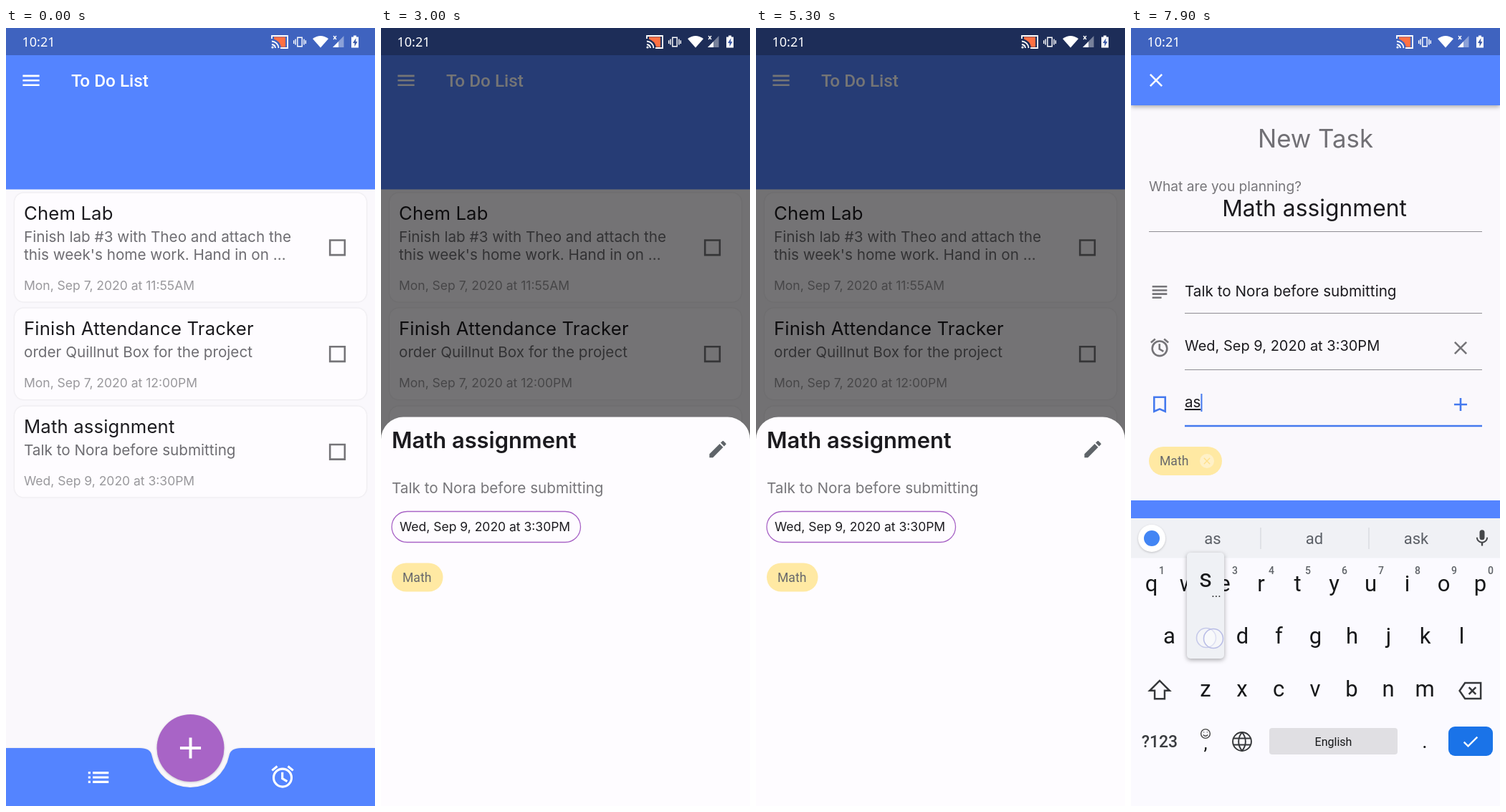
Recreate the animation shown at these times as an HTML page. Size 515 by 1087 pixels, loop 8000 ms.

```html
<!DOCTYPE html>
<html lang="en">
<head>
<meta charset="utf-8">
<title>To Do List</title>
<style>
html, body { margin: 0; width: 515px; height: 1087px; overflow: hidden; }
svg { display: block; }
text { font-family: Inter, sans-serif; white-space: pre; }
.rb { font-family: Roboto, sans-serif; }
.st { font-family: "Noto Sans", sans-serif; }
.mid { text-anchor: middle; }
.flat { filter: drop-shadow(0 .3px 1.2px #0002); }
.low { filter: drop-shadow(0 1px 1.5px #0003); }
.high { filter: drop-shadow(0 2px 3px #0005); }
</style>
</head>
<body>
<svg id="stage" width="515" height="1087" viewBox="0 0 515 1087"></svg>
<script>
const BLUE = '#5484ff', PURPLE = '#a864c6', YELLOW = '#ffe9a3', PAPER = '#faf8fc';
const INK = '#1c1b1f', GREY = '#6e6d72', PALE = '#99989c', KEY = '#17181a';

// Icons on a 24 unit grid; those listed in SOLID are filled, the rest stroked.
const ICONS = {
  menu: 'M3 7h18M3 12h18M3 17h18',
  plus: 'M12 5v14M5 12h14',
  close: 'M5.7 5.7l12.6 12.6M18.3 5.7L5.7 18.3',
  list: 'M3 8h2M3 12h2M3 16h2M7 8h14M7 12h14M7 16h14',
  subject: 'M4 6h16M4 10h16M4 14h16M4 18h10',
  box: 'M4 4h16v16H4z',
  bookmark: 'M6 4h12v15.5l-6-2.6-6 2.6z',
  alarm: 'M4 13a8 8 0 1 0 16 0a8 8 0 1 0-16 0M11.8 8v5.6l4.3 2.6M2.6 6.5l4.6-3.8M21.4 6.5l-4.6-3.8',
  shift: 'M12 3.5L3 12.5h4.5V20h9v-7.5H21z',
  erase: 'M7 4h16v16H7L1.5 12zM11 8.5l7 7M18 8.5l-7 7',
  globe: 'M2 12a10 10 0 1 0 20 0a10 10 0 1 0-20 0M3 8.5h18M3 15.5h18M12 2c-5 6-5 14 0 20c5-6 5-14 0-20',
  check: 'M4 12.5l5 5L20 6.5',
  smile: 'M3 12a9 9 0 1 0 18 0a9 9 0 1 0-18 0M8 9h1.5M14.5 9h1.5M7.5 14q4.5 5 9 0',
  vibrate: 'M8 4h8v16H8zM4.5 7v10M19.5 7v10M1.5 9v6M22.5 9v6',
  edit: 'M3 17.25V21h3.75L17.8 9.94l-3.75-3.75zM20.7 7.04a1 1 0 0 0 0-1.41l-2.34-2.34a1 1 0 0 0-1.41 0l-1.83 1.83 3.75 3.75z',
  mic: 'M12 14a3 3 0 0 0 3-3V5a3 3 0 0 0-6 0v6a3 3 0 0 0 3 3zM17.3 11a5.3 5.1 0 0 1-10.6 0H5a7 7 0 0 0 6 6.7V21h2v-3.3a7 7 0 0 0 6-6.7z'
};
const SOLID = ['edit', 'mic'];

const icon = (name, x, y, size, color, weight = 2) =>
  `<path d="${ICONS[name]}" transform="translate(${x - size / 2} ${y - size / 2}) scale(${size / 24})" ` +
  (SOLID.includes(name) ? `fill="${color}"/>` : `fill="none" stroke="${color}" stroke-width="${weight}"/>`);
const text = (s, x, y, size, color, cls = '', more = '') =>
  `<text x="${x}" y="${y}" font-size="${size}" fill="${color}" class="${cls}" ${more}>${s}</text>`;
const rect = (x, y, w, h, color, r = 0, more = '') =>
  `<rect x="${x}" y="${y}" width="${w}" height="${h}" rx="${r}" fill="${color}" ${more}/>`;
const disc = (x, y, r, color, more = '') => `<circle cx="${x}" cy="${y}" r="${r}" fill="${color}" ${more}/>`;
const rule = (x, y, more = '') => `<path d="M${x} ${y}H490" stroke="#8f8e93" stroke-width="1.2" ${more}/>`;

const NOTE = 'Talk to Nora before submitting', DUE = 'Wed, Sep 9, 2020 at 3:30PM';

function card(top, bottom, title, lines, date) {
  return rect(12, top, 491, bottom - top, '#fefcff', 13, 'class="flat"') +
    text(title, 25, top + 37.5, 25.7, INK, '', 'letter-spacing=".15"') +
    lines.map((s, i) => text(s, 25, top + 68.5 + i * 25.3, 20.7, GREY)).join('') +
    text(date, 25, bottom - 17, 17.5, PALE) +
    icon('box', 462.5, (top + bottom) / 2 + .3, 31, '#757478');
}

const home = rect(0, 0, 515, 1087, PAPER) + rect(0, 0, 515, 225.5, BLUE) +
  icon('menu', 35, 73.3, 31, '#fff') + text('To Do List', 91, 82, 24.3, '#fff', 'rb', 'font-weight="500"') +
  card(230.5, 382.5, 'Chem Lab', ['Finish lab #3 with Theo and attach the', "this week's home work. Hand in on …"], 'Mon, Sep 7, 2020 at 11:55AM') +
  card(391.5, 519, 'Finish Attendance Tracker', ['order Quillnut Box for the project'], 'Mon, Sep 7, 2020 at 12:00PM') +
  card(528.5, 655.5, 'Math assignment', [NOTE], DUE) +
  '<clipPath id="cardClip"><rect x="12" y="528" width="491" height="128" rx="13"/></clipPath>' +
  disc(0, 0, 0, '#000', 'id="splash" clip-path="url(#cardClip)"') +
  `<path class="low" fill="${BLUE}" d="M0 1006H186.5Q201.5 1006 203.5 1016.4A55 55 0 0 0 311.5 1016.4Q313.5 1006 328.5 1006H515V1087H0z"/>` +
  disc(257.5, 1006, 47, PURPLE, 'class="low"') + icon('plus', 257.5, 1006, 50, '#fff', 1.9) +
  icon('list', 129, 1047, 38, '#fff') + icon('alarm', 386, 1046, 37.5, '#fff');

const sheet = '<path d="M0 600V31.3A31.3 31.3 0 0 1 31.3 0H483.7A31.3 31.3 0 0 1 515 31.3V600z" fill="#fefcff"/>' +
  text('Math assignment', 15, 43.5, 30.9, INK, '', 'font-weight="600"') +
  icon('edit', 470, 45, 31, '#5f6469') + text(NOTE, 15, 106, 20.7, '#77767a') +
  rect(15, 132, 263.5, 43, 'none', 21.5, `stroke="${PURPLE}" stroke-width="1.3"`) + text(DUE, 26, 159.5, 17.5, INK) +
  rect(15, 204, 71.5, 40, YELLOW, 20) + text('Math', 30, 230, 17.6, '#66676b', 'rb');

const page = rect(0, 0, 515, 1087, PAPER) + rect(0, 0, 515, 108, BLUE, 0, 'class="high"') +
  icon('close', 35, 73, 31, '#fff') +
  text('New Task', 257.5, 167, 34.8, '#717075', 'mid') +
  text('What are you planning?', 25, 228, 19.2, '#77767a') +
  text('Math assignment', 256, 262.5, 31.8, INK, 'mid') + rule(25, 284.5) +
  icon('subject', 40, 369, 31, '#757478') + text(NOTE, 75, 375, 20.7, INK) + rule(75, 398.5) +
  icon('alarm', 40, 446.5, 31, '#757478') + text(DUE, 75, 451, 20, INK) + icon('close', 460, 447, 31, '#757478') + rule(75, 477.5) +
  '<g id="tagIcons">' + icon('bookmark', 40, 526, 31, 'currentColor') + icon('plus', 460, 526, 31, 'currentColor') + '</g>' +
  text('', 75, 530, 20.6, GREY, '', 'id="tag"') + rect(0, 511, 2, 25, '#4479ee', 0, 'id="caret"') + rule(75, 556, 'id="tagRule"') +
  rect(25, 585, 102, 40, YELLOW, 20) + text('Math', 40, 611, 17.6, '#66676b', 'rb') +
  disc(106, 605, 10, '#fff1c8') + icon('close', 106, 605, 16, '#ffe08a') +
  `<g id="update">${rect(0, 0, 515, 430, BLUE)}${text('Update', 257.5, 51, 29, '#fff', 'mid')}</g>`;

const keyRow = (letters, x, y) =>
  [...letters].map((c, i) => text(c, x + i * 51, y, 31, KEY, 'rb mid')).join('');
const keyboard = rect(0, 685, 515, 402, '#fbfaff') + rect(0, 685, 515, 55.5, '#f0f1f5') +
  disc(29, 713, 19, '#fff', 'class="low"') + disc(29, 713, 11, '#4285f4') +
  '<path d="M181 698v30M332 698v30" stroke="#cfd1d6"/>' +
  [114, 256, 398].map((x, i) => text('', x, 721, 22, '#5c6067', 'rb mid', `id="word${i}"`)).join('') +
  icon('mic', 490, 713, 28, '#444649') +
  keyRow('qwertyuiop', 28.5, 787) + keyRow('asdfghjkl', 53.5, 860) + keyRow('zxcvbnm', 104, 934) +
  [...'1234567890'].map((c, i) => text(c, 43 + i * 51, 763, 14, '#5f6368', 'rb mid', 'font-weight="500"')).join('') +
  icon('shift', 40, 925, 37, '#35373a', 1.6) + icon('erase', 473, 926, 33, '#35373a', 1.8) +
  text('?123', 40, 1005, 23, '#3a3c40', 'rb mid', 'font-weight="500"') +
  icon('smile', 104, 986, 17, '#444') + text(',', 104, 1008, 26, KEY, 'rb mid') +
  icon('globe', 155, 997, 31, '#35373a', 1.5) +
  rect(193, 978, 179, 37, '#e0dfe3', 4) + text('English', 282.5, 1002.5, 16, KEY, 'rb mid') +
  text('.', 410, 1006, 28, KEY, 'rb mid') +
  rect(443, 976, 62, 41, '#1a73e8', 9) + icon('check', 474, 997, 28, '#fff') +
  '<g id="popup">' + rect(-26, 733, 52, 148, '#eff1f5', 5, 'class="high"') +
  text('', 0, 781, 35, KEY, 'rb mid', 'id="popLetter"') + text('...', 15, 795, 17, KEY, 'rb mid') + '</g>';

const status = rect(0, 0, 515, 38, '#000', 0, 'opacity=".25"') + text('10:21', 22.5, 26, 18, '#fff', 'st') +
  '<path d="M374 12.5H390V26.5H384Q382 18 374 15.5z" fill="#ff7043"/>' +
  '<path d="M371 15V11H393V28H383M371 18.5a10 10 0 0 1 9.5 9.5M371 23a5.5 5.5 0 0 1 5 5" fill="none" stroke="#fff" stroke-width="1.8"/>' +
  disc(372, 27, 1.6, '#fff') + icon('vibrate', 410, 19.5, 19, '#fff', 1.8) +
  '<path d="M428 15q11-8 22 0l-11 12.5z" fill="#fff"/>' +
  '<path d="M471.5 11V27H456z" fill="#fff" opacity=".4"/><path d="M464 19V27H456z" fill="#fff"/>' +
  '<path d="M457 11l4 5M461 11l-4 5" stroke="#fff" stroke-width="1.3"/>' +
  '<path d="M482 12.5h3v-2h4v2h3V27.5h-10z" fill="#fff"/><path d="M488.5 14l-4.5 7h2.5v5l4-7h-2.500z" fill="#3b59a8"/>';

// Finger contacts: start, release, x, y and optional distance dragged down.
const TOUCHES = [
  [800, 950, 75, 580], [3600, 3740, 417, 640, 324], [4900, 5000, 60, 589], [5600, 5700, 470, 588],
  [6800, 6850, 200, 525], [7400, 7500, 54, 852], [7800, 7850, 105, 852], [7800, 8000, 115, 853]
];

document.getElementById('stage').innerHTML = home + rect(0, 0, 515, 1087, '#000', 0, 'id="scrim"') +
  `<g id="sheet">${sheet}</g><g id="page">${page}</g><g id="keyboard">${keyboard}</g>` +
  TOUCHES.map((_, i) => disc(0, 0, 13.5, '#ffffff66', `id="touch${i}" stroke="#b9bde6" stroke-width="1.6"`)).join('') + status;

const $ = id => document.getElementById(id);
const set = (id, attrs) => { for (const k in attrs) $(id).setAttribute(k, attrs[k]); };
const show = (id, on) => set(id, { visibility: on ? 'visible' : 'hidden' });
const clamp = v => Math.min(1, Math.max(0, v));

function bezier(x1, y1, x2, y2) {
  const at = (a, b, u) => 3 * a * u * (1 - u) ** 2 + 3 * b * u * u * (1 - u) + u ** 3;
  return x => {
    let lo = 0, hi = 1;
    for (let i = 0; i < 24; i++) {
      const u = (lo + hi) / 2;
      if (at(x1, x2, u) < x) lo = u; else hi = u;
    }
    return x <= 0 ? 0 : x >= 1 ? 1 : at(y1, y2, lo);
  };
}
const ease = bezier(.25, .1, .25, 1), easeIn = bezier(.42, 0, 1, 1);
const decelerate = bezier(0, 0, .2, 1), standard = bezier(.4, 0, .2, 1);

function drawSheet(t) {
  const opened = t < 4500 ? 950 : 4983;
  const dragging = t > 3550 && t < 4500;
  const progress = dragging ? clamp(1 - .856 * ((t - 3550) / 250) ** 1.3) : clamp((t - opened) / 250);
  const height = dragging ? progress : decelerate(progress);
  set('scrim', { opacity: .54 * ease(progress) });
  set('sheet', { transform: `translate(0 ${1087 - 543.5 * height})` });

  const since = t - opened, [, , x, y] = TOUCHES[t < 4500 ? 0 : 2];
  set('splash', {
    cx: x, cy: y, r: 18 + .0073 * Math.max(0, since) ** 2,
    opacity: since < -150 ? 0 : .12 * clamp(1 - since / 190)
  });
}

function drawPage(t) {
  const p = clamp((t - 5683.5) / 300);
  set('page', { opacity: easeIn(p), transform: `translate(0 ${271.75 * (1 - standard(p))})` });

  const focused = t >= 6900, typed = t >= 7900 ? 'as' : t >= 7500 ? 'a' : '';
  set('tagIcons', { color: focused ? '#4479ee' : '#757478' });
  set('tagRule', focused ? { stroke: '#4479ee', 'stroke-width': 2.5 } : { stroke: '#8f8e93', 'stroke-width': 1.2 });
  $('tag').textContent = typed || 'Add tags';
  set('tag', { fill: typed ? INK : GREY, 'text-decoration': typed ? 'underline' : 'none' });
  set('caret', { x: 75 + (typed ? $('tag').getComputedTextLength() : 0) });
  show('caret', focused);
  set('update', { transform: `translate(0 ${t >= 7000 ? 660 : 1005})` });

  set('keyboard', { transform: `translate(0 ${402 * (1 - standard(clamp((t - 6900) / 200)))})` });
  const words = { '': ['I', 'the', "I'm"], a: ['a', 'as', 'and'], as: ['as', 'ad', 'ask'] }[typed];
  words.forEach((w, i) => { $('word' + i).textContent = w; });
  const pressed = t >= 7800 ? 's' : t >= 7400 && t < 7600 ? 'a' : '';
  show('popup', pressed);
  $('popLetter').textContent = pressed;
  set('popup', { transform: `translate(${pressed === 's' ? 104 : 53} 0)` });
}

function drawTouches(t) {
  TOUCHES.forEach(([from, to, x, y, drag = 0], i) => set('touch' + i, {
    cx: x, cy: y + drag * clamp((t - from) / (to - from)),
    opacity: t < from ? 0 : clamp(1 - (t - to) / 200)
  }));
}

function frame(now) {
  const t = Math.floor(now % 8000 / 100) * 100;
  drawSheet(t);
  drawPage(t);
  drawTouches(t);
  requestAnimationFrame(frame);
}
frame(0);
</script>
</body>
</html>
```
